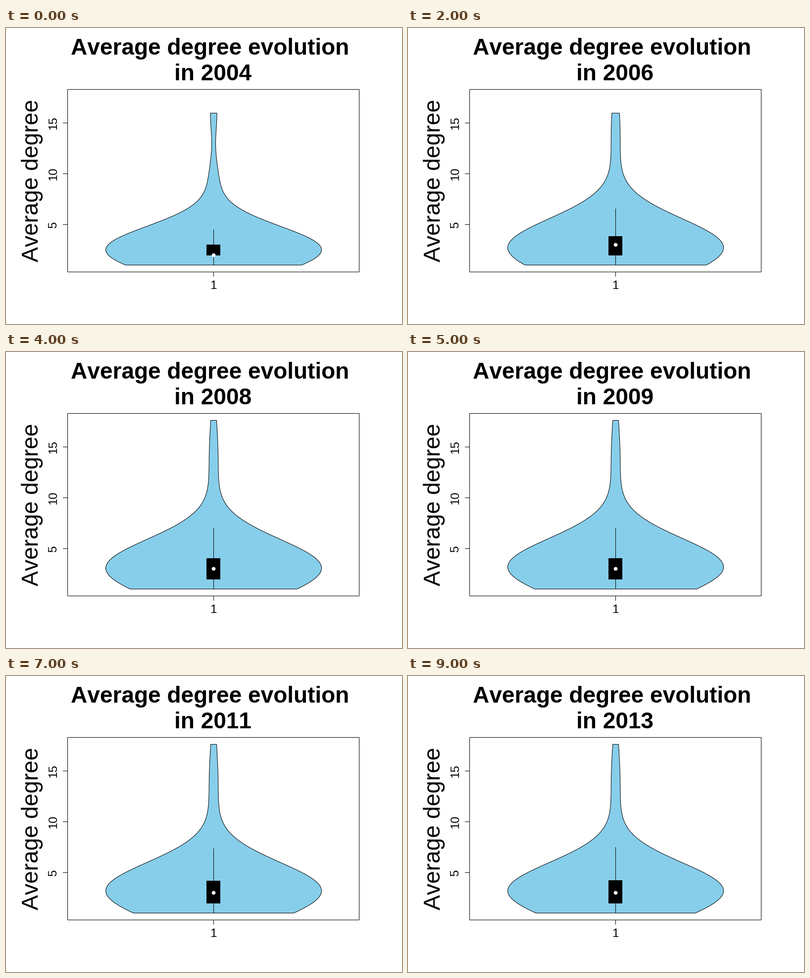
A matplotlib script that plays this animation: 800x600 px, repeating every 10 s.

```python
import math

import numpy as np
import matplotlib.pyplot as plt
from matplotlib.animation import FuncAnimation
from matplotlib.patches import Circle, Polygon, Rectangle

plt.rcParams["font.family"] = "Liberation Sans"
plt.rcParams["text.kerning_factor"] = 6  # practically no kerning

W, H, DPI = 800, 600, 100
PX = 72 / DPI
CX = 419.5
HALF = 218
FIRST_YEAR, YEARS = 2004, 10


def to_y(value):
    return 501.3 - 20.58 * value


def row(value):
    """Centre of the pixel row that holds a value."""
    return math.floor(to_y(value)) + 0.5


def bump(v, centre, height, spread):
    return height * np.exp(-0.5 * ((v - centre) / spread) ** 2)


def smoothstep(t):
    t = min(max(t, 0), 1)
    return t * t * (3 - 2 * t)


def density(v, i):
    """Main hump that drifts upward, plus a thin tail."""
    mode = 2.5 + 0.68 * smoothstep(i / 5.5)
    if i < 2:
        d = (bump(v, mode, HALF, 2.36) + bump(v, 9.3, 9, 2.1)
             + bump(v, 16, 6.5, 2))
    else:
        d = bump(v, mode, HALF, 2.92 - 0.012 * i) + bump(v, 13.7, 9, 4.3)
    return d * HALF / d.max()


def outline(i):
    top = 16 if i < 4 else 17.65
    v = np.linspace(1, top, 100)
    w = density(v, i)
    y = np.interp(v, [1, top], [row(1), row(top)])
    left = np.column_stack([CX - w, y])
    right = np.column_stack([CX + w, y])
    return np.vstack([left, right[::-1]])


def quartiles(i):
    q3 = np.interp(i, [0, 1, 2, 4, 5, 7, 9],
                   [3, 3.45, 3.83, 4, 4, 4.15, 4.2])
    return 2, min(3, 2 + 0.9 * i), q3


fig = plt.figure(figsize=(W / DPI, H / DPI), dpi=DPI, facecolor="white")
ax = fig.add_axes([0, 0, 1, 1])
ax.set_xlim(0, W)
ax.set_ylim(H, 0)
ax.axis("off")


def line(x, y, z=3):
    return ax.plot(x, y, color="black", lw=PX, snap=False,
                   solid_capstyle="butt", solid_joinstyle="miter",
                   zorder=z)[0]


def label(x, y, text, size, **kw):
    return ax.text(x, y, text, fontsize=size * PX, color="black", ha="left",
                   va="baseline", rotation_mode="anchor", **kw)


label(131, 54, "Average degree evolution", 45.95, weight="bold")
title = label(340, 106, "", 46, weight="bold")
label(65, 474, "Average degree", 46.3, rotation=90)
label(412.5, 529, "1", 24)

line([124.5, 713.5, 713.5, 124.5, 124.5], [124.5, 124.5, 494.5, 494.5, 124.5])
line([CX, CX], [494.5, 504])
for value in (5, 10, 15):
    y = row(value)
    line([115, 124.5], [y, y])
    label(102, y + 6.67 * len(str(value)), str(value), 24, rotation=90)

violin = ax.add_patch(Polygon([[0, 0], [1, 1]], closed=True, fc="#87CEEB",
                              ec="black", lw=PX, snap=False, zorder=2))
whisker = line([], [], 4)
box = ax.add_patch(Rectangle((405, 0), 28, 1, fc="black", lw=0, zorder=5))
dot = ax.add_patch(Circle((CX, 0), 3.8, fc="white", lw=0, zorder=6))


def draw(i):
    q1, median, q3 = quartiles(i)
    title.set_text(f"in {FIRST_YEAR + i}")
    violin.set_xy(outline(i))
    whisker.set_data([CX, CX], [to_y(q3 + 1.5 * (q3 - q1)), row(1)])
    top, bottom = row(q3) - 0.5, row(q1) + 0.5
    box.set_y(top)
    box.set_height(bottom - top)
    dot.center = (CX, row(median))
    return title, violin, whisker, box, dot


anim = FuncAnimation(fig, draw, frames=YEARS, interval=1000, repeat=True,
                     repeat_delay=0, blit=False)
plt.show()
```
